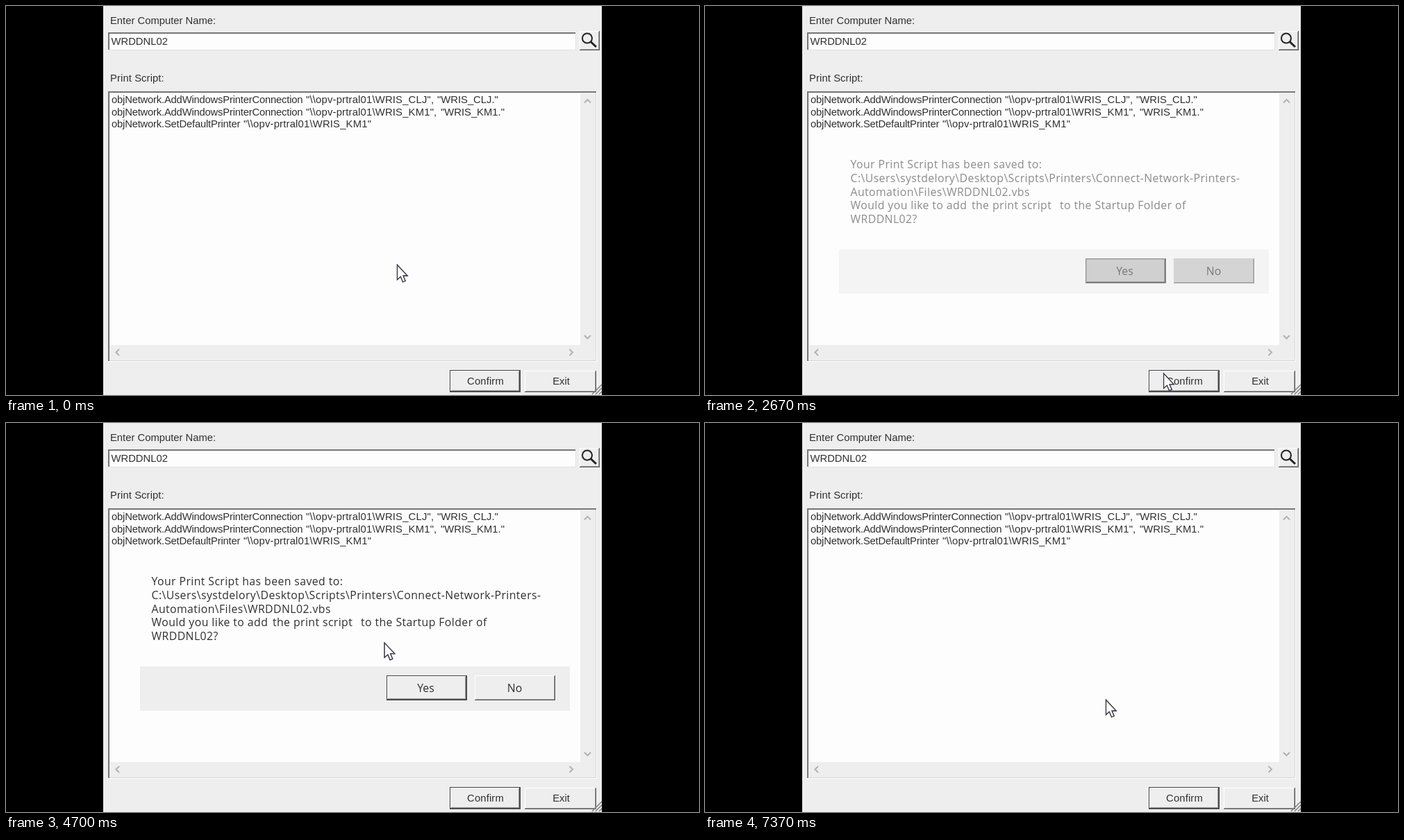
Write an HTML page with a canvas that moves like this. It is 998 px wide and 561 px high and loops after 8 s.

```html
<!DOCTYPE html>
<html lang="en">
<head>
<meta charset="utf-8">
<title>Print script</title>
<style>
html, body { margin: 0; height: 100%; overflow: hidden; background: #000; }
canvas { display: block; }
</style>
</head>
<body>
<canvas id="stage" width="998" height="561"></canvas>
<script>
const ctx = document.getElementById('stage').getContext('2d');
const LOOP = 8000;
const FACE = '#eeeeee', PAPER = '#fdfdfd', INK = '#303030', SHADE = '#777777', LIGHT = '#ffffff';
const FORM = '14.8px "Liberation Sans", Arial, sans-serif';
const DIALOG = '15.8px "Open Sans", "Noto Sans", sans-serif';

// Pointer tip: time, x, y
const PATH = [
  [30, 563, 373], [830, 664, 527], [1000, 663, 525], [1600, 667, 541], [2600, 667, 542],
  [3230, 471, 192], [3370, 471, 192], [3930, 521, 280], [4170, 514, 277], [4830, 548, 321],
  [5700, 548, 321], [6450, 594, 391], [6530, 594, 391], [6970, 577, 399]
];

const clamp = v => Math.min(1, Math.max(0, v));
const ramp = (t, start, end) => clamp((t - start) / (end - start));
const smooth = u => u * u * (3 - 2 * u);

function box(x, y, right, bottom, color) {
  ctx.fillStyle = color;
  ctx.fillRect(x, y, right - x, bottom - y);
}

function bevel(x, y, right, bottom, topLeft, bottomRight, fill, width = 2) {
  box(x, y, right, bottom, bottomRight);
  box(x, y, right - 1, bottom - 1, topLeft);
  box(x + width, y + width, right - 1, bottom - 1, fill);
}

function raised(x, y, right, bottom) {
  box(x, y, right, bottom, '#555555');
  box(x, y, right - 1, bottom - 1, LIGHT);
  box(x + 1, y + 1, right - 1, bottom - 1, '#a0a0a0');
  box(x + 1, y + 1, right - 2, bottom - 2, FACE);
}

function defaultButton(x, y, right, bottom) {
  box(x, y, right, bottom, '#404040');
  raised(x + 1, y + 1, right - 1, bottom - 1);
}

function text(str, x, y, font = FORM, spacing = 0, align = 'left') {
  ctx.font = font;
  ctx.letterSpacing = spacing + 'px';
  ctx.textAlign = align;
  ctx.fillStyle = INK;
  ctx.fillText(str, x, y);
}

function line(points, color, width) {
  ctx.beginPath();
  points.forEach(([x, y]) => ctx.lineTo(x, y));
  ctx.strokeStyle = color;
  ctx.lineWidth = width;
  ctx.stroke();
}

function chevron(x, y, turns) {
  ctx.save();
  ctx.translate(x, y);
  ctx.rotate(turns * Math.PI / 2);
  line([[-4.5, 2.5], [0, -2], [4.5, 2.5]], '#b2b2b2', 2);
  ctx.restore();
}

function codeLine(y, call, callEnd, path, pathEnd = 0, alias = '') {
  text(call, 152, y, FORM, -0.2);
  text(path, callEnd, y, FORM, 0.2);
  text(alias, pathEnd, y);
}

function drawForm() {
  box(0, 0, 998, 561, '#000');
  box(140, 0, 858, 561, FACE);
  text('Enter Computer Name:', 150, 25.5);
  bevel(147, 38, 821, 64, SHADE, '#e2e2e2', PAPER);
  text('WRDDNL02', 151.5, 56);

  raised(826, 36, 855, 64);
  ctx.beginPath();
  ctx.arc(837, 46.5, 7, 0, 7);
  ctx.strokeStyle = '#222';
  ctx.lineWidth = 2;
  ctx.stroke();
  line([[842, 51.5], [850, 59]], '#222', 3);

  text('Print Script:', 150, 109, FORM, 0.1);
  bevel(147, 123, 851, 513, SHADE, '#ffffff', FACE);
  box(149, 511, 850, 512, '#d4d4d4');
  box(849, 125, 850, 512, '#d4d4d4');
  box(150, 126, 827, 489, PAPER);
  chevron(837.5, 137, 0);
  chevron(814, 499.5, 1);
  chevron(837.5, 477.5, 2);
  chevron(160.5, 499.5, 3);
  const add = 'objNetwork.AddWindowsPrinterConnection';
  codeLine(140, add, 432, '"\\\\opv-prtral01\\WRIS_CLJ",', 621, '"WRIS_CLJ."');
  codeLine(157.5, add, 432, '"\\\\opv-prtral01\\WRIS_KM1",', 626, '"WRIS_KM1."');
  codeLine(175, 'objNetwork.SetDefaultPrinter', 342, '"\\\\opv-prtral01\\WRIS_KM1"');

  defaultButton(639, 525, 741, 557);
  text('Confirm', 690.5, 546, FORM, 0.15, 'center');
  raised(747, 526, 850, 557);
  text('Exit', 799.5, 546, FORM, 0, 'center');
  for (const d of [4, 9, 14]) line([[858 - d, 560], [858, 560 - d]], '#808080', 1.6);
}

function drawDialog(alpha) {
  if (!alpha) return;
  ctx.globalAlpha = alpha;
  const say = (str, x, row) => text(str, x, 234 + 19.8 * row, DIALOG, 0.42);
  say('Your Print Script has been saved to:', 209.5, 0);
  say('C:\\Users\\systdelory\\Desktop\\Scripts\\Printers\\Connect-Network-Printers-', 209.5, 1);
  say('Automation\\Files\\WRDDNL02.vbs', 209.5, 2);
  say('Would you like to add', 209.5, 3);
  say('the print script', 384, 3);
  say('to the Startup Folder of', 511, 3);
  say('WRDDNL02?', 209.5, 4);
  box(193, 351, 812, 415, FACE);
  defaultButton(548, 364, 664, 400);
  text('Yes', 604.5, 387.5, DIALOG, 0, 'center');
  raised(675, 364, 791, 400);
  text('No', 732.5, 387.5, DIALOG, 0, 'center');
  ctx.globalAlpha = 1;
}

function drawPointer(t) {
  const next = PATH.findIndex(p => p[0] > t);
  const to = PATH.at(next);
  const from = next < 0 ? to : PATH[Math.max(0, next - 1)];
  const u = from === to ? 0 : smooth(ramp(t, from[0], to[0]));
  ctx.save();
  ctx.translate(from[1] + (to[1] - from[1]) * u + 0.5, from[2] + (to[2] - from[2]) * u + 0.5);
  ctx.fillStyle = '#fff';
  ctx.strokeStyle = '#3c3c48';
  ctx.lineWidth = 1.3;
  ctx.stroke(new Path2D('M0 0V21L4.8 16.8 8 24.5 11.6 23 8.4 15.5H14.5Z'));
  ctx.fill(new Path2D('M0 0V21L4.8 16.8 8 24.5 11.6 23 8.4 15.5H14.5Z'));
  ctx.stroke(new Path2D('M0 0V21L4.8 16.8 8 24.5 11.6 23 8.4 15.5H14.5Z'));
  ctx.restore();
}

function frame(now) {
  const t = now % LOOP;
  drawForm();
  drawDialog(ramp(t, 2560, 2760) * (1 - ramp(t, 7110, 7340)));
  drawPointer(t);
  requestAnimationFrame(frame);
}
requestAnimationFrame(frame);
</script>
</body>
</html>
```
